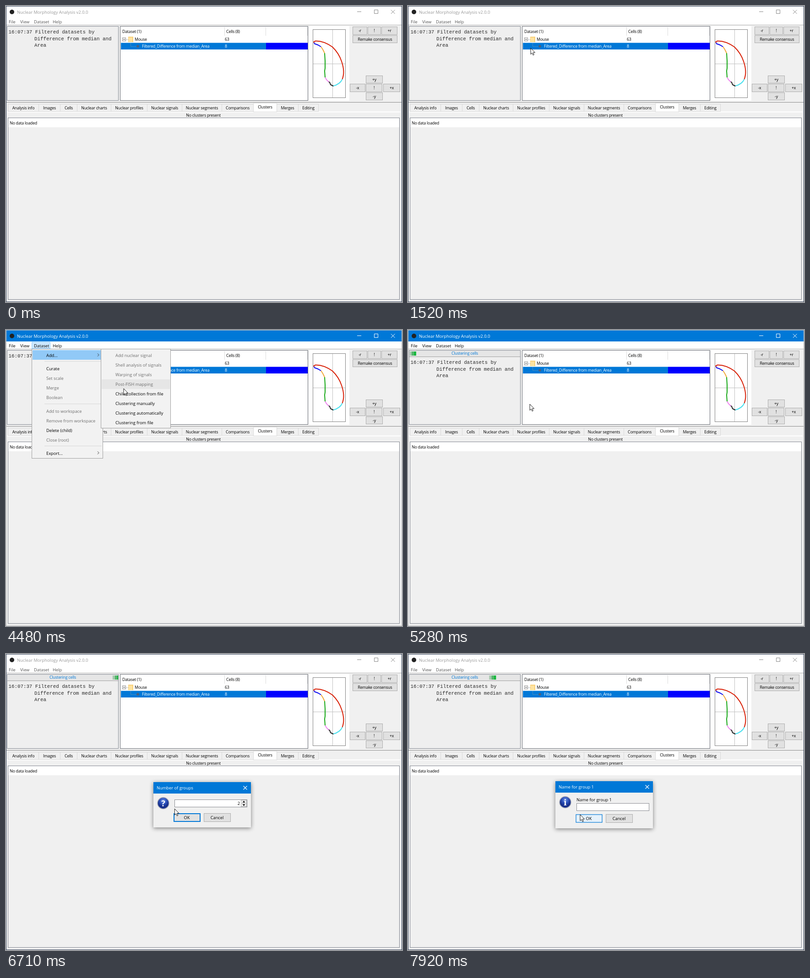
These frames come from a looping animation (865 px wide and 647 px high, 7.99 s). An HTML page:

```html
<!DOCTYPE html>
<html lang="en">
<head>
<meta charset="utf-8">
<title>Clustering manually</title>
<style>
  html, body { margin: 0; width: 100%; height: 100%; overflow: hidden; background: #f0f0f0; }
  svg { display: block; width: 865px; height: 647px; }
  text { font: 9.3px "Open Sans", "Noto Sans", sans-serif; fill: #000; white-space: pre; }
  .sm { font-size: 8.8px; letter-spacing: -.22px; }
  .mono { font: 10.8px "Liberation Mono", monospace; fill: #2a2a2a; }
  .mid { text-anchor: middle; }
  .end { text-anchor: end; }
  .off { fill: #6d6d6d; }
  .white { fill: #fff; }
  .blue { fill: #0078d7; }
  .bar { fill: #fff; }
  .caption { font-size: 9.4px; fill: #999; }
  .controls { fill: none; stroke: #888; }
  .menubar text { fill: #555; }
  .frame { fill: none; stroke: #3c4a60; }
  .active .bar { fill: #0078d7; }
  .active .caption { fill: #fff; }
  .active .controls { stroke: #fff; }
  .active .menubar text { fill: #000; }
  .active .frame { stroke: #c4c4c4; }
  .ok { fill: #e1e1e1; stroke: #0078d7; stroke-width: 2; }
  .ok.hover { fill: #e5f1fb; stroke-width: 1.2; }
  .dialog { filter: drop-shadow(0 2px 5px #0007); transform-origin: 428.5px 330px; }
</style>
</head>
<body>
<svg id="stage" viewBox="0 0 865 647"></svg>
<script>
const LOOP = 7990, STEP = 67.6;
const stage = document.getElementById('stage');

// Markup helpers
const box = (x, y, w, h, fill, stroke, extra = '') => stroke
  ? `<rect x="${x + .5}" y="${y + .5}" width="${w - 1}" height="${h - 1}" fill="${fill}" stroke="${stroke}" ${extra}/>`
  : `<rect x="${x}" y="${y}" width="${w}" height="${h}" fill="${fill}" ${extra}/>`;
const label = (x, y, str, cls = '') => `<text x="${x}" y="${y}" class="${cls}">${str}</text>`;
const line = (d, stroke, width = 1, extra = '') =>
  `<path d="${d}" fill="none" stroke="${stroke}" stroke-width="${width}" ${extra}/>`;
const group = (id, body, cls = '') => `<g id="${id}" class="${cls}">${body}</g>`;
const button = (x, y, w, h, str) =>
  box(x, y, w, h, '#e1e1e1', '#adadad') + label(x + w / 2, y + h / 2 + 3, str, 'sm mid');

function titleBar() {
  const menus = [[6, 'File'], [31, 'View'], [61, 'Dataset'], [102, 'Help']];
  return box(0, 0, 865, 42, '#fff') +
    '<rect class="bar" width="865" height="25"/><circle cx="13" cy="13" r="5" fill="#222"/>' +
    label(24, 16.5, 'Nuclear Morphology Analysis v2.0.0', 'caption') +
    '<path class="controls" d="M767 12.500h9M804.500 8.500h8v8h-8zM841 8.500l8.500 8.500m0-8.500l-8.500 8.500"/>' +
    line('M0 41.500H865', '#b4b4b4') +
    group('opened', box(56, 26, 41, 15, '#cce8ff', '#99d1ff')) +
    group('menus', menus.map(([x, s]) => label(x, 37.5, s)).join(''), 'menubar');
}

function logPanel() {
  return box(2, 44, 244, 163, '#efefef', '#828790') +
    group('log', label(5.5, 60, '16:07:37 Filtered datasets by', 'mono') +
      label(62, 74.5, 'Difference from median and', 'mono') + label(62, 89, 'Area', 'mono')) +
    group('progress', box(3, 45, 242, 14, '#e6e6e6') + line('M3 58.500H245', '#a0a0a0') +
      '<g clip-path="url(#track)">' + group('marquee', box(0, 47, 5, 9, '#a5c9ad') +
        box(5, 47, 5, 9, '#55b56c') + box(10, 47, 5, 9, '#16b83c')) + '</g>' +
      label(124, 54, 'Clustering cells', 'sm mid blue'));
}

function datasetTable() {
  return box(249, 44, 411, 163, '#fff', '#6a6e76') +
    line('M477.500 46V65M567.500 46V65M658.500 46V65', '#dcdcdc') +
    label(254, 59, 'Dataset (1)', 'sm') + label(481, 59, 'Cells (8)', 'sm') +
    box(251, 80.5, 317, 14.5, '#0078d7') + box(568, 80.5, 91, 14.5, '#00f') +
    box(254, 69, 8, 8, '#fff', '#919191') + line('M256 73h4', '#333') +
    line('M262 73.500h5M272.500 81v7.500h12', '#8a9aaa', 1, 'stroke-dasharray="1 1"') +
    box(267, 67, 11, 12, '#f8d17c') + box(268, 69, 8, 10, '#ffe3a1') +
    '<circle cx="288" cy="88" r="2.800" fill="#4d5f7c"/>' +
    label(281, 76, 'Mouse', 'sm') + label(478, 76, '63', 'sm') +
    label(297, 91, 'Filtered_Difference from median_Area', 'sm white') + label(478, 91, '8', 'sm white');
}

function consensus() {
  const outline = [
    ['#d81e05', 'M673 81L672.500 78L676 76.500Q694 76 713 89.500Q727 103 733 121Q741 144 734.500 160'],
    ['#4ce0ee', 'M734.500 160Q730 171 714 175'],
    ['#222', 'M715 175L709 172L707 167L704 165'],
    ['#ee82ee', 'M705 166L700 161L697 156'],
    ['#12a612', 'M697 156L696 142L697 136V120L696 103'],
    ['#f0a83c', 'M696 103L692 95L688 89'],
    ['#0a0af0', 'M688 89L681 85L674 82.500L673 80']
  ];
  return box(661, 44, 89, 163, '#fff') + box(670, 51, 72, 150, '#fff', '#808080') +
    line('M713.500 52V200M671 126.500H741', '#c0c0c0') +
    outline.map(([color, d]) => line(d, color, 2)).join('') +
    [[757, 45, 32, 18, '-r'], [790, 45, 29, 18, '!'], [820, 45, 35, 18, '+r'],
     [757, 64, 98, 17, 'Remake consensus'], [786, 152, 37, 17, '+y'], [751, 170, 34, 18, '-x'],
     [786, 170, 36, 18, '!'], [824, 170, 37, 18, '+x'], [786, 189, 37, 17, '-y']]
      .map(b => button(...b)).join('');
}

function tabs() {
  const names = ['Analysis info', 'Images', 'Cells', 'Nuclear charts', 'Nuclear profiles', 'Nuclear signals',
    'Nuclear segments', 'Comparisons', 'Clusters', 'Merges', 'Editing'];
  const edges = [4, 71, 118, 155, 229, 308, 384, 471, 540, 591, 638, 682];
  const tab = (name, i) => {
    const x = edges[i], w = edges[i + 1] - x + 1, front = name === 'Clusters';
    return box(x, front ? 212 : 214, w, front ? 20 : 17, front ? '#fff' : '#f0f0f0', '#d9d9d9') +
      label(x + w / 2, front ? 224 : 225.5, name, 'sm mid');
  };
  return line('M0 210.500H865', '#8a8a8a') + box(2, 230, 860, 3, '#fbfbfb') + names.map(tab).join('') +
    label(431, 242, 'No clusters present', 'sm mid') +
    box(4, 244, 856, 398, '#f0f0f0', '#828790') + box(5, 245, 854, 20, '#fff') +
    label(8, 259, 'No data loaded', 'sm');
}

const arrow = y => line(`M200 ${y - 3}l3 3l-3 3`, '#333');

function datasetMenu() {
  const items = [[55, 'Add...', 1], [84, 'Curate', 1], [105, 'Set scale'], [126, 'Merge'], [147, 'Boolean'],
    [177, 'Add to workspace'], [198, 'Remove from workspace'], [219, 'Delete (child)', 1],
    [240, 'Close (root)'], [269, 'Export...', 1]];
  return group('menu', box(56, 41, 156, 240, '#f2f2f2', '#a0a0a0') +
    line('M84 68.500H209M84 161.500H209M84 253.500H209', '#d7d7d7') +
    box(58, 44, 152, 21, '#91c9f7', '', 'id="addRow"') +
    items.map(([y, s, on]) => label(88, y + 3.5, s, on ? '' : 'off')).join('') + arrow(54.5) + arrow(268.5));
}

function addMenu() {
  const items = ['Add nuclear signal', 'Shell analysis of signals', 'Warping of signals', 'Post-FISH mapping',
    'Child collection from file', 'Clustering manually', 'Clustering automatically', 'Clustering from file'];
  return group('submenu', box(207, 41, 153, 174, '#f2f2f2', '#a0a0a0') +
    box(209, 0, 149, 21, '#e6e6e6', '', 'id="subRow"') +
    items.map((s, i) => label(239, 58.5 + 21.1 * i, s, i < 4 ? 'off' : '')).join(''));
}

function dialog(id, title, top, height, iconY, sign, okY, body) {
  return group(id, box(322, top, 213, height, '#f0f0f0') + box(322, top, 213, 25, '#0078d7') +
    label(329, top + 16, title, 'white') + line(`M518.500 ${top + 8.5}l8 8m0-8l-8 8`, '#fff', 1.1) +
    `<circle cx="343.500" cy="${iconY}" r="12.500" fill="url(#ball)" stroke="#a9adb8" stroke-width="1.500"/>` +
    `<text x="343.500" y="${iconY + 6.5}" class="mid white" style="font:bold 18px ` +
    `${sign === 'i' ? "'Noto Serif',serif" : "'Open Sans',sans-serif"}">${sign}</text>` + body +
    `<rect class="ok" x="367" y="${okY + 1}" width="57" height="17"/>` + label(395, okY + 13, 'OK', 'mid') +
    box(432, okY, 59, 19, '#e1e1e1', '#adadad') + label(461, okY + 13, 'Cancel', 'mid'), 'dialog');
}

stage.innerHTML =
  `<defs><radialGradient id="ball" cy=".3"><stop offset="0" stop-color="#6d93e6"/>
   <stop offset=".6" stop-color="#2b4fb8"/><stop offset="1" stop-color="#17308c"/></radialGradient>
   <clipPath id="track"><path d="M4 45H245V58H4z"/></clipPath></defs>` +
  box(0, 0, 865, 647, '#f0f0f0') + titleBar() + logPanel() + datasetTable() + consensus() + tabs() +
  '<rect class="frame" x=".5" y=".5" width="864" height="646"/>' + datasetMenu() + addMenu() +
  dialog('countDialog', 'Number of groups', 280, 99, 326, '?', 348,
    box(368, 318, 159, 17, '#fff', '#8a8c92') + label(511, 330, '2', 'end') +
    box(513, 319, 13, 15, '#f0f0f0', '#b8b8b8') + line('M513 326.500h13', '#b8b8b8') +
    '<path d="M516.500 324.500l3-3.500l3 3.500zM516.500 328.500l3 3.500l3-3.500z"/>') +
  dialog('nameDialog', 'Name for group 1', 278, 103, 324, 'i', 350,
    label(368, 321.5, 'Name for group 1') + box(368, 326, 159, 17, '#fff', '#8a8c92') +
    box(371, 328, 1, 12, '#000', '', 'id="caret"')) +
  '<path id="pointer" d="M0 0V13.500L3 10.700L5.200 15.500L7.300 14.500L5.200 9.900H9.500Z" fill="#fff" stroke="#000" stroke-width=".9"/>';

const el = {};
stage.querySelectorAll('[id]').forEach(node => el[node.id] = node);

// Pointer moves: start time, number of steps, waypoints [progress, x, y]
const moves = [
  [650, 12, [[0, 848, 621], [.5, 500, 300], [1, 307, 119]]],
  [1460, 12, [[0, 307, 119], [1 / 6, 268, 92], [.6, 155, 52], [1, 86, 34]]],
  [3130, 6, [[0, 86, 34], [.2, 86, 34], [.7, 89, 47], [1, 89, 47]]],
  [4080, 12, [[0, 89, 47], [.33, 225, 75], [.583, 257, 128], [1, 266, 162]]],
  [6030, 12, [[0, 266, 162], [.5, 330, 275], [1, 376, 351]]]
];

const clamp = v => Math.max(0, Math.min(1, v));
const ramp = (t, start, length) => clamp((t - start) / length);
const stepsSince = (t, start) => Math.floor((t - start + 10) / STEP);

function pointerAt(t) {
  const move = moves.findLast(m => t >= m[0]);
  if (!move) return null;
  const [start, count, path] = move;
  const p = clamp((stepsSince(t, start) + 1) / count);
  const i = Math.max(1, path.findIndex(point => point[0] >= p));
  const [p0, x0, y0] = path[i - 1], [p1, x1, y1] = path[i];
  const k = (p - p0) / (p1 - p0);
  return [x0 + (x1 - x0) * k, y0 + (y1 - y0) * k];
}

function show(node, opacity) {
  node.style.display = opacity > 0 ? '' : 'none';
  node.style.opacity = opacity;
}

function showDialog(node, amount, hover) {
  show(node, amount);
  node.style.transform = `scale(${.95 + .05 * amount})`;
  node.querySelector('.ok').classList.toggle('hover', hover);
}

function draw(t) {
  const pointer = pointerAt(t);
  show(el.pointer, pointer ? 1 : 0);
  if (pointer) el.pointer.setAttribute('transform', `translate(${pointer})`);
  const [px, py] = pointer || [0, 0];

  const menuOpen = t >= 2270 && t < 5220;
  stage.classList.toggle('active', t >= 2270 && t < 5360);
  show(el.opened, menuOpen ? 1 : 0);
  show(el.menu, menuOpen ? ramp(t, 2200, 200) : 0);
  show(el.addRow, t >= 3330 ? 1 : 0);
  show(el.submenu, menuOpen ? ramp(t, 3360, 150) : 0);
  const row = Math.floor((py - 45) / 21.1);
  show(el.subRow, px > 208 ? 1 : 0);
  el.subRow.setAttribute('y', 44.5 + 21.1 * row);
  el.subRow.setAttribute('fill', row < 4 ? '#e6e6e6' : '#91c9f7');

  const busy = t >= 5220;
  show(el.progress, busy ? 1 : 0);
  el.log.setAttribute('transform', `translate(0 ${busy ? 14 : 0})`);
  const tick = 5220 + stepsSince(t, 5220) * STEP;
  const slide = ((tick - 5270) * .162 + 252.6) % 252.6;
  el.marquee.setAttribute('transform', `translate(${slide})`);

  showDialog(el.countDialog, ramp(t, 5330, 200) - ramp(t, 6810, 130), px > 366 && py > 348);
  showDialog(el.nameDialog, ramp(t, 6960, 140), t >= 7200);
  show(el.caret, t % 1000 < 500 ? 1 : 0);
}

function loop(now) {
  draw(now % LOOP);
  requestAnimationFrame(loop);
}
draw(0);
requestAnimationFrame(loop);
</script>
</body>
</html>
```
